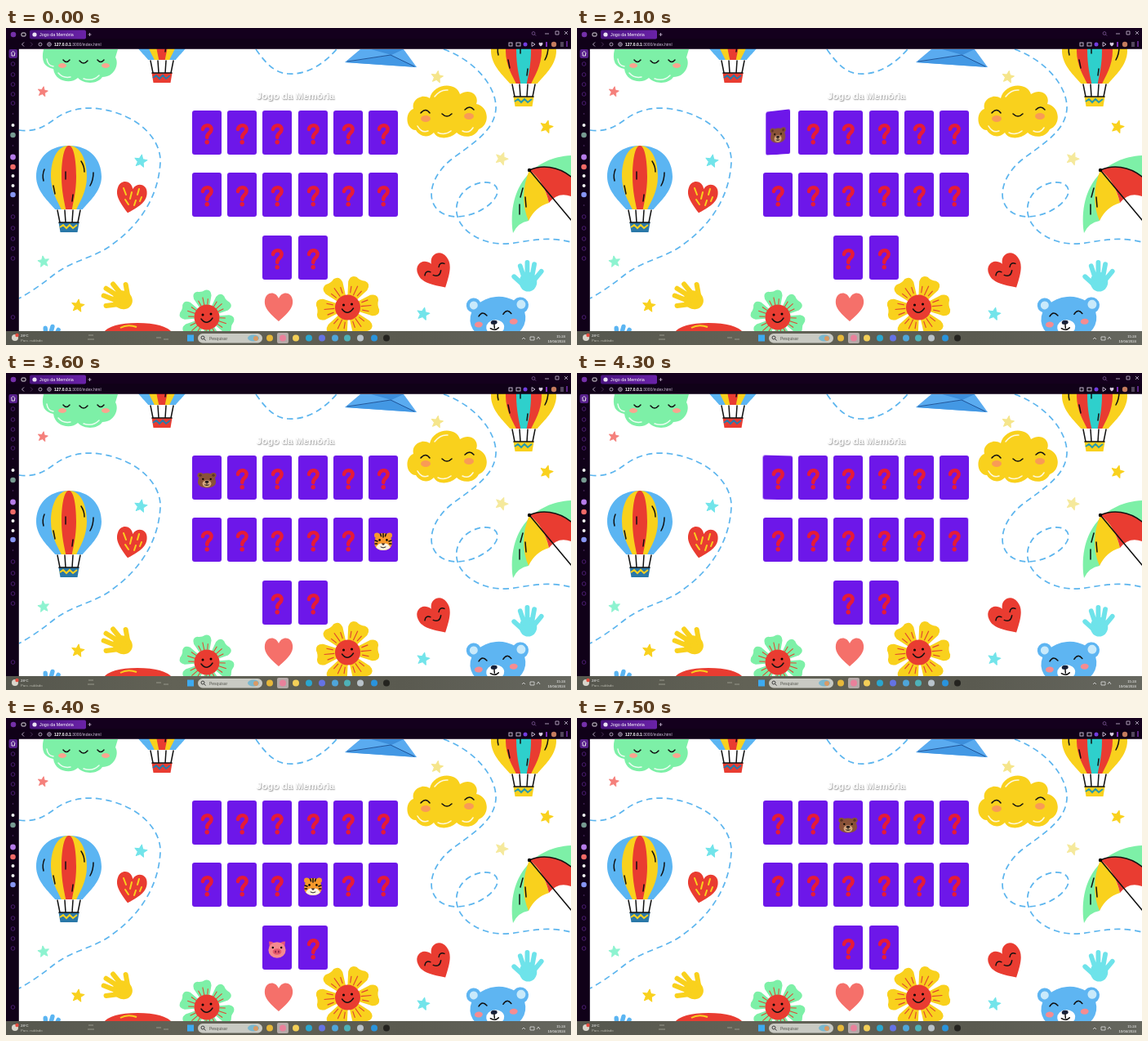
An HTML page that plays this animation: 692x388 px, repeating every 8 s.

```html
<!DOCTYPE html>
<html lang="pt">
<head>
<meta charset="utf-8">
<title>Jogo da Memória</title>
<style>
html, body { margin: 0; width: 100%; height: 100%; overflow: hidden; background: #fff; }
#scene { position: absolute; left: 0; top: 0; overflow: hidden; }
text { font-family: "Liberation Sans", Arial, sans-serif; fill: #fff; }
#board { position: absolute; left: 16px; top: 0; width: 676px; height: 388px; overflow: hidden; perspective: 360px; perspective-origin: 50% 204.5px; }
.card { position: absolute; width: 36px; height: 54px; transform-style: preserve-3d; }
.face { position: absolute; inset: 0; border-radius: 3px; background: #6d17e9; backface-visibility: hidden; }
.back { transform: rotateY(180deg); }
.face svg { display: block; }
.ink { fill: none; stroke: #111; stroke-width: 1.5; stroke-linecap: round; stroke-linejoin: round; }
.trail { fill: none; stroke: #5cb5ee; stroke-width: 1.7; stroke-dasharray: 7.5 5; }
.gleam { fill: none; stroke: #fff; stroke-width: 1.5; stroke-linecap: round; opacity: .85; }
.thin { stroke-width: .9; }
</style>
</head>
<body>
<svg id="scene" width="692" height="388" viewBox="0 0 692 388">
  <defs>
    <linearGradient id="task"><stop stop-color="#55564d"/><stop offset=".3" stop-color="#626256"/><stop offset=".7" stop-color="#5a5a50"/><stop offset="1" stop-color="#66675f"/></linearGradient>
    <linearGradient id="tab"><stop stop-color="#4a1480"/><stop offset="1" stop-color="#6a22a8"/></linearGradient>
    <symbol id="star" overflow="visible"><path d="M0-8 2.2-2.8 7.6-2.5 3.5 1.2 4.7 6.5 0 3.6-4.7 6.5-3.5 1.2-7.6-2.5-2.2-2.8Z" fill="currentColor" stroke="currentColor" stroke-linejoin="round"/></symbol>
    <symbol id="heart" overflow="visible"><path d="M0 18C-14 6-18 0-17-8C-16-18-4-20 0-10C4-20 16-18 17-8C18 0 14 6 0 18Z" fill="currentColor"/></symbol>
    <symbol id="hand" overflow="visible"><ellipse cy="3" rx="10" ry="11" fill="currentColor"/><path d="M-4 0-9-15M-1-2-1-19M4-1 7-17M6 2 15-9M-5 7-16-3" stroke="currentColor" stroke-width="5.4" stroke-linecap="round"/></symbol>
    <symbol id="mark" overflow="visible"><path d="M-5-6C-4-12.500 6.200-12.500 5.500-5.400C5-1.500 0-1 .2 4" fill="none" stroke="#e51b38" stroke-width="4.500" stroke-linecap="round"/><circle cx=".2" cy="9.800" r="2.700" fill="#e51b38"/></symbol>
    <symbol id="bear" overflow="visible">
      <g transform="translate(0 1)scale(1 .9)">
      <g fill="#8a5238"><circle cx="-8" cy="-6.5" r="3.6"/><circle cx="8" cy="-6.5" r="3.6"/><path d="M0-9.5C8-9.5 11-3 11 3C11 8 6 10.5 0 10.5S-11 8-11 3C-11-3-8-9.5 0-9.5Z"/></g>
      <g fill="#5c3425"><circle cx="-8" cy="-6.5" r="1.7"/><circle cx="8" cy="-6.5" r="1.7"/></g>
      <ellipse cy="5" rx="5.4" ry="4.6" fill="#d6a77f"/><ellipse cy="2.4" rx="2.5" ry="1.7" fill="#26191a"/>
      <path d="M0 4V6.4M-2.6 6.6Q0 8.3 2.6 6.6" class="ink thin"/>
      <circle cx="-4.7" cy="-1.3" r="1.2"/><circle cx="4.7" cy="-1.3" r="1.2"/>
      </g>
    </symbol>
    <symbol id="pig" overflow="visible">
      <path d="M-10-9.5Q-3-9.5-3-5L-9-1ZM10-9.5Q3-9.5 3-5L9-1Z" fill="#e8567c"/>
      <ellipse cy="1" rx="10.6" ry="9.8" fill="#f58a8f"/><ellipse cy="3" rx="5.3" ry="3.8" fill="#e4586c"/>
      <g fill="#8c2449"><ellipse cx="-1.9" cy="3" rx="1" ry="1.6"/><ellipse cx="1.9" cy="3" rx="1" ry="1.6"/></g>
      <circle cx="-5.2" cy="-2" r="1.2"/><circle cx="5.2" cy="-2" r="1.2"/>
    </symbol>
    <symbol id="tiger" overflow="visible">
      <g fill="#f7992b"><circle cx="-7.7" cy="-7.3" r="3.3"/><circle cx="7.7" cy="-7.3" r="3.3"/><path d="M0-10C8-10 10.5-4 10.8 3C10 9 5 11 0 11S-10 9-10.8 3C-10.5-4-8-10 0-10Z"/></g>
      <path d="M0 3C5 1 7 5 9 7C7 10 3 11 0 11S-7 10-9 7C-7 5-5 1 0 3Z" fill="#fff3df"/>
      <path d="M0-9.5V-5M-3.4-9-2.5-6.3M3.4-9 2.5-6.3M-10-1-7 0M10-1 7 0M-10 3-7.5 3M10 3 7.5 3" class="ink"/>
      <circle cx="-4.4" cy="-1.6" r="1.3"/><circle cx="4.4" cy="-1.6" r="1.3"/>
      <path d="M-2.5 2.5H2.5L0 5Z" fill="#35201c"/><path d="M-3 7Q0 9 3 7" class="ink thin"/>
    </symbol>
  </defs>

  <path d="M306 26C318 43 329 55 345 56S382 52 405 26M16 125C38 128 49 119 62 110C76 100 96 96 115 99C162 106 190 136 189 164C187 205 165 240 130 265C108 282 80 284 56 304Q36 320 16 331M536 26C575 40 601 72 600 99C598 127 570 142 544 162C512 189 513 228 550 231C580 231 602 211 602 200C602 187 581 184 563 198C543 216 549 247 585 260C622 273 642 250 692 262" class="trail"/>

  <path d="M46 26Q41 47 58 50C60 66 80 69 88 61C97 70 113 68 118 60C133 60 139 44 134 36L137 26Z" fill="#7df0a7"/>
  <path d="M70 39Q74 44 78 39M112 39Q116 44 120 39M90 40Q95 46 100 40" class="ink"/>
  <g fill="#f9a58f"><ellipse cx="69" cy="46" rx="5" ry="3"/><ellipse cx="122" cy="46" rx="5" ry="3"/></g>
  <path d="M50 38Q51 46 58 47M64 55Q70 62 79 60M95 62Q106 66 114 58" class="gleam"/>

  <g id="balloons"></g>

  <path d="M434 26 415 42 503 48 487 26Z" fill="#5aabf0"/><path d="M415 42 472 33 503 48Z" fill="#4398e4"/><path d="M447 26 472 33 487 26Z" fill="#3c8edb"/>
  <path d="M418 41 471 33 500 47" class="ink thin" style="stroke:#1d4f91"/>

  <path d="M502 125C489 124 488 103 499 99C496 87 510 80 519 86C523 68 551 65 556 81C568 73 580 82 576 93C592 96 593 119 579 124C573 136 558 134 552 128C541 138 527 135 524 128C516 136 506 132 502 125Z" fill="#f9d11d"/>
  <path d="M508 104Q514 97 519 104M562 100Q568 94 573 100M534 105Q540 111 546 105" class="ink"/>
  <g fill="#f99b55"><ellipse cx="514" cy="111" rx="6" ry="4"/><ellipse cx="567" cy="108" rx="6" ry="4"/></g>
  <path d="M504 120Q509 129 517 126M529 128Q537 132 545 126M559 126Q567 130 572 122M525 84Q532 75 541 76" class="gleam"/>

  <path d="M692 156C648 158 613 192 621 251Q627 238 640 236L641 174 692 190Z" fill="#7df0a7"/>
  <path d="M641 174C632 195 632 218 640 236Q648 219 665 214C661 196 653 183 641 174Z" fill="#f9d11d"/>
  <path d="M641 174C653 183 661 196 665 214Q676 200 692 206V182C676 169 656 167 641 174Z" fill="#e93c31"/>
  <path d="M641 174 692 235M641 174C656 167 676 169 692 182M633 196 630 207M629 216 629 228M636 207 637 219" class="ink"/>
  <circle cx="641" cy="174" r="2.2"/>

  <use href="#heart" transform="translate(153 207.5)rotate(12)scale(1.07)" color="#e93c31"/>
  <path d="M144 196 147 204M154 201 152 209M163 197 161 204M146 210 150 216M159 211 157 217M166 207 164 212" stroke="#f9d11d" stroke-width="2" stroke-linecap="round"/>
  <g transform="translate(527 299)rotate(-31)">
    <use href="#heart" transform="scale(1.2)" color="#e93c31"/>
    <path d="M-14-4Q-10-9-6-4M6-4Q10-9 14-4M-5 1Q0 8 6 1" class="ink"/>
  </g>
  <use href="#heart" x="334" y="341" color="#f5706a"/>
  <use href="#hand" transform="translate(639.5 307.5)scale(1.08)" color="#6ee3ea"/>
  <use href="#hand" transform="translate(140 331)rotate(-58)scale(-1.12 1.12)" color="#f9d11d"/>
  <use href="#hand" transform="translate(53 384)rotate(15)" color="#5bb5f2"/>
  <g id="stars"></g>
  <g id="flowers"></g>

  <path d="M119 373Q128 361 161 361T204 373Z" fill="#e93c31"/><path d="M140 367Q149 362 160 366" stroke="#f9d11d" stroke-width="2" fill="none"/>
  <g transform="rotate(-5 601 352)">
    <g fill="#5eb5f2"><circle cx="574" cy="337" r="9"/><circle cx="631" cy="342" r="10"/><ellipse cx="602" cy="356" rx="34" ry="27"/></g>
    <circle cx="574" cy="337" r="5" fill="#c9eafb"/><circle cx="632" cy="341" r="5.500" fill="#c9eafb"/>
    <ellipse cx="598" cy="366" rx="11" ry="9" fill="#fff"/><ellipse cx="597" cy="360" rx="4" ry="2.500" fill="#172038"/>
    <path d="M579 351Q584 344 589 351M609 351Q614 344 619 351M597 362V367M592 367Q597 371 602 367" class="ink"/>
    <g fill="#f58c91"><ellipse cx="578" cy="361" rx="5" ry="3.500"/><ellipse cx="621" cy="361" rx="5" ry="3.500"/></g>
  </g>

  <text x="354.5" y="87.4" text-anchor="middle" font-size="11.6" font-weight="700" style="text-shadow:.6px .6px 1.5px #888">Jogo da Memória</text>

  <path d="M0 0H692V25.700H15.800V371H0Z" fill="#100118"/>
  <path d="M0 0H692V13H0Z" fill="#14001d"/>
  <rect x="29" y="2.5" width="69" height="11" rx="2" fill="url(#tab)"/>
  <circle cx="35" cy="8" r="2.6" fill="#ece4f5"/>
  <text x="41" y="10" font-size="5.4">Jogo da Memória</text>
  <circle cx="9" cy="8" r="3.3" fill="#7430a8"/>
  <rect x="19" y="6" width="5" height="4" rx="1" fill="none" stroke="#ddd"/>
  <path d="M100.500 8H104.500M102.500 6V10M660 7H665M684 4 688 8M688 4 684 8M673 4H677V8H673Z" stroke="#c9bcd4" stroke-width=".8" fill="none"/>
  <circle cx="646" cy="6.500" r="1.900" fill="none" stroke="#7d5a96" stroke-width=".8"/><path d="M647.500 8 649 9.500" stroke="#7d5a96" stroke-width=".8"/>
  <path d="M22 17.500 19.500 20 22 22.500" fill="none" stroke="#c9bcd4" stroke-width=".9"/><path d="M30 17.500 32.500 20 30 22.500" fill="none" stroke="#4a3158"/>
  <circle cx="42" cy="20" r="2" fill="none" stroke="#c9bcd4" stroke-width=".8"/>
  <circle cx="53" cy="20" r="2.300" fill="none" stroke="#c9bcd4" stroke-width=".8"/><path d="M50.700 20H55.300M53 17.700V22.300" stroke="#c9bcd4" stroke-width=".5"/>
  <text x="59" y="21.700" font-size="5"><tspan font-weight="700">127.0.0.1</tspan><tspan fill="#cfc3d8">:3000/index.html</tspan></text>
  <g fill="none" stroke="#cfc3d8" stroke-width=".9"><rect x="616" y="18" width="4" height="4"/><rect x="625" y="18" width="5" height="4"/><path d="M644 17.500 648 20 644 22.500Z"/></g>
  <circle cx="636" cy="20" r="2.500" fill="#713de0"/>
  <use href="#heart" transform="translate(655 20)scale(.14)" color="#d8cce0"/>
  <rect x="661" y="17" width="2" height="6" fill="#8030bd"/><circle cx="671" cy="20" r="3.200" fill="#c47b5d"/><path d="M679 18H683M679 20H683M679 22H683" stroke="#cfc3d8" stroke-width=".7"/><rect x="686" y="16" width="2" height="7" fill="#5d2388"/>
  <rect x="3.500" y="26" width="10.500" height="11" rx="2" fill="#57208b"/>
  <path d="M6 31 8.700 28.500 11.500 31M7 31V34H10.500V31" fill="none" stroke="#eee" stroke-width=".9"/>
  <g id="side"></g>

  <rect y="371" width="692" height="17" fill="url(#task)"/>
  <circle cx="11" cy="379" r="4" fill="#d9d6cc"/><circle cx="13.500" cy="376" r="2.200" fill="#e64c3f"/>
  <text x="18" y="378" font-size="4.300">28°C</text><text x="18" y="384" font-size="4.300" style="fill:#bdbdb2">Parc. nublado</text>
  <path d="M101 376H107M100 381H108M184 379H190M193 381H199" stroke="#97988b"/>
  <rect x="235" y="374" width="79" height="11.500" rx="5.700" fill="#c9cac3"/>
  <circle cx="241" cy="379" r="2" fill="none" stroke="#333" stroke-width=".9"/><path d="M242.500 380.500 244.500 382.500" stroke="#333"/>
  <text x="249" y="381.500" font-size="5" style="fill:#55564f">Pesquisar</text>
  <ellipse cx="303" cy="379.500" rx="7" ry="4" fill="#7ab8cf"/><circle cx="306" cy="380" r="3" fill="#d99a66"/>
  <rect x="332" y="373" width="14" height="13" rx="2" fill="#b5aaa8"/>
  <g id="apps"></g>
  <path d="M632 381 634 379 636 381M642 378H647V382H642ZM650 381 652 378 654 381" fill="none" stroke="#ddd" stroke-width=".8"/>
  <g text-anchor="end" font-size="4.300"><text x="685" y="378.500">15:24</text><text x="685" y="384.500">10/04/2024</text></g>
</svg>
<div id="board"></div>

<script>
const $ = id => document.getElementById(id);
const draw = (id, list, part) => $(id).innerHTML = list.map(a => part(...a)).join('');

// Balloons hang from the middle of the envelope's lower edge.
const half = (w, s) => `M0-78C${-w * .67 * s}-78 ${-w * s}-60 ${-w * s}-40C${-w * s}-22 ${-w * .6 * s}-9 ${-w * .42 * s} 0H0Z`;
const lobe = (w, c) => `<path d="${half(w, 1)}${half(w, -1)}" fill="${c}"/>`;
draw('balloons', [
  [77, 222, '#5bb5f2', '#f9d11d', '#e93c31', '#2a78a8', '#f9d11d'],
  [191, 39, '#5bb5f2', '#f9d11d', '#e93c31', '#e93c31', '#2a78a8'],
  [634, 68, '#f9d11d', '#e93c31', '#2ed0cc', '#f9d11d', '#2a9aaa']
], (x, y, a, b, c, basket, trim) => `<g transform="translate(${x} ${y})">
  ${lobe(40, a)}${lobe(22, b)}${lobe(9, c)}
  <path d="M-14 1-11 16M-5 1-4 16M5 1 4 16M14 1 11 16M-30-49Q-33-42-31-35M-19-29-17-19M-4-46-4-37M15-59Q19-53 19-46M30-45Q30-36 26-29M5-18 4-10" class="ink"/>
  <path d="M-12.5 16H12.5L10.5 28H-10.5Z" fill="${basket}"/>
  <path d="M-11 22-7 19-3 23 1 19 5 23 10 19" fill="none" stroke="${trim}" stroke-width="2"/>
  <path d="M-12 16H12" class="ink"/></g>`);

draw('stars', [
  [45, 78, .8, '#f5807b', 10], [528, 60, .95, '#f5e58b', 10], [662, 121, 1, '#f9d11d', 15], [607, 160, 1, '#f5e99c', 20],
  [165, 163, 1, '#72e4ea', 10], [46, 286, .9, '#8df3d0', -8], [88, 340, 1, '#f9d11d', 8], [511, 350, 1, '#72e4ea', 12]
], (x, y, s, c, r) => `<use href="#star" transform="translate(${x} ${y})rotate(${r})scale(${s})" color="${c}"/>`);

const petals = (n, part) => Array.from({ length: n }, (_, i) => `<g transform="rotate(${i * 360 / n})">${part}</g>`).join('');
draw('flowers', [[246, 354, '#7df0a7', 1, -12], [418.5, 342, '#f9d11d', 1.16, 25]],
  (x, y, c, s, turn) => `<g transform="translate(${x} ${y})">
  <g transform="rotate(${turn})scale(${s})">${petals(6, `<path d="M-4-8-11-25Q-12-33-5-33Q0-31 5-33Q12-33 11-25L4-8Z" fill="${c}"/><path d="M0-14V-25M-4-15-6-22M4-15 6-22" stroke="#e0452f"/>`)}</g>
  <circle r="15.5" fill="#e93c31"/><circle cx="-5" cy="-3" r="1.5"/><circle cx="5" cy="-4" r="1.5"/>
  <path d="M-7 2Q0 11 7 1" class="ink"/></g>`);

const dot = (x, y, r, c, open) => `<circle cx="${x}" cy="${y}" r="${r}" ${open ? 'fill="none" stroke' : 'fill'}="${c}"/>`;
draw('side', [
  ...[44, 57, 69, 81, 92, 231, 245, 258, 270, 282, 354].map(y => [8.5, y, 2.3, '#4a1c70', true]),
  ...[105, 144, 217].map(y => [8.5, y, .8, '#58336e']),
  [8.5, 119, 2, '#eee'], [8.5, 131, 3.3, '#779b91'], [8.5, 158, 3.4, '#b57be8'], [8.5, 170, 3.3, '#f06a67'],
  [8.5, 181, 2, '#eee'], [8.5, 193, 2, '#eee'], [8.5, 204, 3.3, '#8795f2']
], dot);
draw('apps', [
  [323, '#e7b83a'], [339, '#e9819b'], [355, '#f3cf58'], [371, '#2aa6cf'], [387, '#6472e5'],
  [403, '#4fa5d9'], [418, '#4eb2b8'], [434, '#b9c3ca'], [451, '#2a93dc'], [466, '#24231f']
], (x, c) => dot(x, 379.5, 4, c));
$('apps').innerHTML += '<rect x="222" y="375.5" width="8" height="8" fill="#3daaf0"/>';

// card: [opens, closes, animal]
const FLIP = 500, LOOP = 8000;
const flips = {
  0: [1800, 3900, 'bear'], 11: [2915, 3900, 'tiger'], 12: [4580, 6700, 'pig'],
  9: [5700, 6700, 'tiger'], 2: [7000, 9000, 'bear']
};
const face = (cls, id) => `<div class="face ${cls}"><svg width="36" height="54" viewBox="-18 -27 36 54"><use href="#${id}" y="2"/></svg></div>`;
const cards = Array.from({ length: 14 }, (_, i) => {
  const row = Math.floor(i / 6), col = i % 6 + (row === 2 ? 2 : 0);
  const el = document.createElement('div');
  el.className = 'card';
  el.style.left = 211.9 + col * 43.25 + 'px';
  el.style.top = 100.7 + row * 76.7 + 'px';
  el.innerHTML = face('', 'mark') + (flips[i] ? face('back', flips[i][2]) : '');
  $('board').append(el);
  return el;
});

// cubic-bezier(.25, .1, .25, 1)
function ease(x) {
  if (x <= 0) return 0;
  if (x >= 1) return 1;
  const curve = (p, q, u) => 3 * p * u * (1 - u) ** 2 + 3 * q * u * u * (1 - u) + u ** 3;
  let lo = 0, hi = 1;
  for (let i = 0; i < 20; i++) {
    const mid = (lo + hi) / 2;
    if (curve(.25, .25, mid) < x) lo = mid; else hi = mid;
  }
  return curve(.1, 1, lo);
}

function frame() {
  const t = performance.now() % LOOP;
  for (const [i, [open, close]] of Object.entries(flips)) {
    const turn = 180 * (ease((t - open) / FLIP) - ease((t - close) / FLIP));
    cards[i].style.transform = `rotateY(${turn}deg)`;
  }
  requestAnimationFrame(frame);
}
frame();
</script>
</body>
</html>
```
